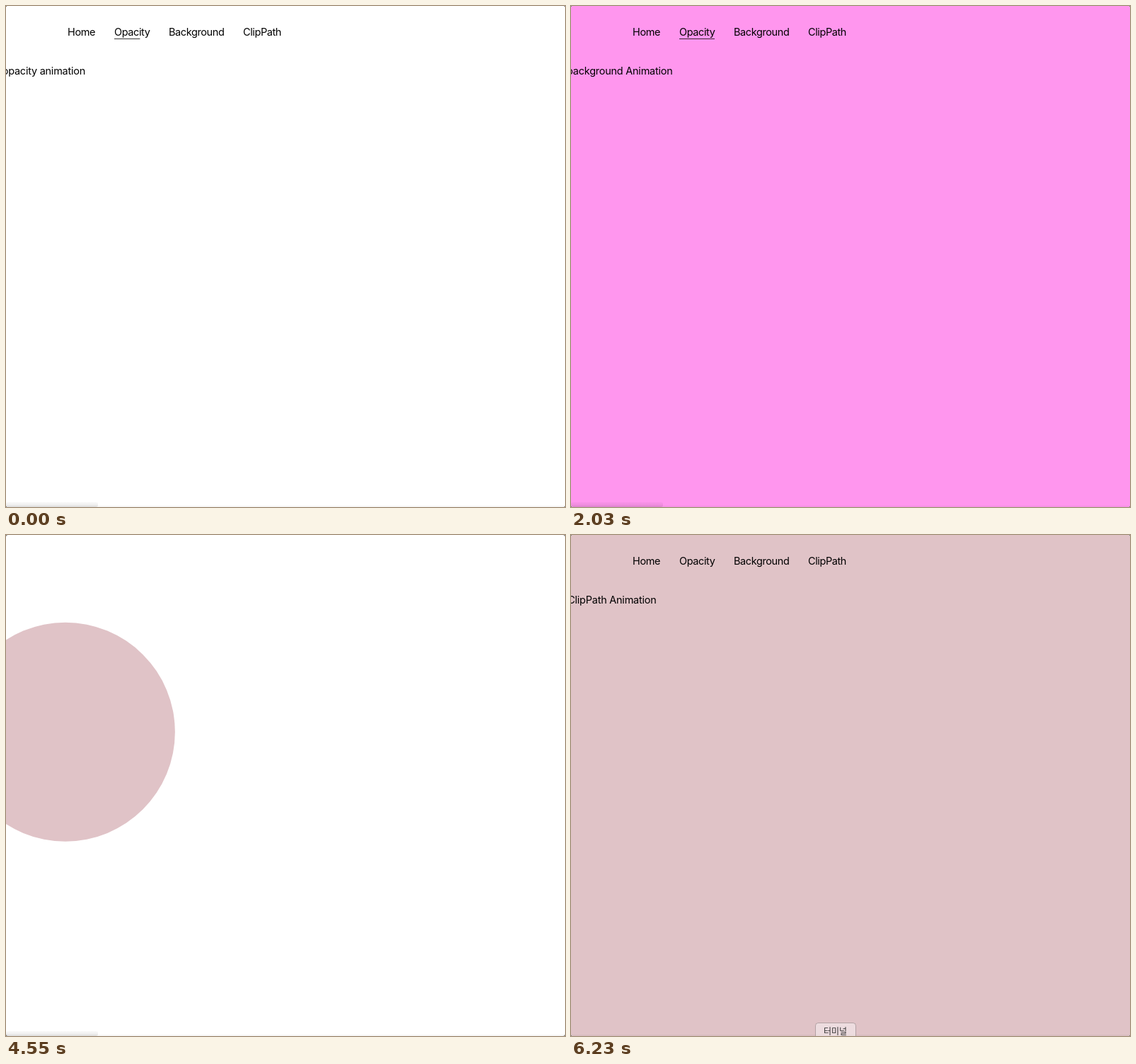
Write an HTML page that moves like this. It is 790 px wide and 709 px high and loops after 6.44 s.

```html
<!DOCTYPE html>
<html lang="en">
<head>
<meta charset="utf-8">
<title>Page transitions</title>
<style>
  html, body { margin: 0; width: 100%; height: 100%; overflow: hidden; background: #666; }
  #window { position: relative; width: 790px; height: 709px; overflow: hidden; border-radius: 3px; background: #fff; }
  #page, #page svg, #dock { position: absolute; inset: 0; }
  text { font: 14.5px Inter, "Open Sans", sans-serif; letter-spacing: -.4px; fill: #000; }
  #title { text-anchor: end; letter-spacing: -.25px; }
  #tip text { font: 12px "Noto Sans CJK KR", "Noto Sans CJK", sans-serif; letter-spacing: 0; text-anchor: middle; fill: #333; }
</style>
</head>
<body>
<div id="window">
  <div id="page">
    <svg width="790" height="709">
      <g id="content">
        <g id="nav"></g>
        <text id="title" y="97"></text>
      </g>
    </svg>
  </div>
  <svg id="dock" width="790" height="709">
    <defs>
      <linearGradient id="shade" x2="0" y2="1">
        <stop offset="0" stop-opacity=".02"/>
        <stop offset="1" stop-opacity=".1"/>
      </linearGradient>
    </defs>
    <rect id="shadow" y="702" width="130" height="7" rx="3" fill="url(#shade)"/>
    <rect y="707" width="790" height="2" fill-opacity=".03"/>
    <g id="tip">
      <rect x="345.5" y="690.5" width="57" height="24" rx="4" fill="#fff" fill-opacity=".42" stroke="#000" stroke-opacity=".22"/>
      <text x="373.5" y="707">터미널</text>
    </g>
  </svg>
</div>
<script>
const LOOP = 6440, STEP = 70, HOVER = 400;
const $ = id => document.getElementById(id);
const clamp = p => Math.min(1, Math.max(0, p));
const span = (t, from, to) => clamp((t - from) / (to - from));
const mix = (a, b, p) => a + (b - a) * p;
const easeInOut = p => p < .5 ? 2 * p * p : 1 - 2 * (1 - p) ** 2;

// CSS "ease": cubic-bezier(.25, .1, .25, 1), solved by bisection
function ease(p) {
  const bezier = (a, b, s) => 3 * a * s * (1 - s) ** 2 + 3 * b * s * s * (1 - s) + s ** 3;
  let low = 0, high = 1;
  for (let i = 0; i < 20; i++) {
    const mid = (low + high) / 2;
    bezier(.25, .25, mid) < p ? low = mid : high = mid;
  }
  return bezier(.1, 1, low);
}
const grow = (t, start, time = HOVER) => ease(span(t, start, start + time));

// Underline width as a share of the label, by time
const links = [
  { label: "Home", x: 87, width: 39, line: () => 0 },
  { label: "Opacity", x: 153, width: 50, line: t =>
      t < 1000 ? 1 - grow(t, -76) : grow(t, 1300) - grow(t, 2500) },
  { label: "Background", x: 230, width: 78, line: t =>
      t < 2000 ? grow(t, 20) - grow(t, 1280) : grow(t, 2560, 220) - grow(t, 2780) },
  { label: "ClipPath", x: 335, width: 55, line: t => t < 5000 ? grow(t, 2796) : 0 }
];

function svg(tag, attrs, parent) {
  const node = document.createElementNS("http://www.w3.org/2000/svg", tag);
  for (const key in attrs) node.setAttribute(key, attrs[key]);
  return parent.appendChild(node);
}
for (const link of links) {
  svg("text", { x: link.x, y: 41.5 }, $("nav")).textContent = link.label;
  link.bar = svg("rect", { x: link.x, y: 46, height: 1, "fill-opacity": .78 }, $("nav"));
}

const pages = {
  opacity: { title: "opacity animation", end: 112, color: "#fff" },
  background: { title: "background Animation", end: 143.5, color: "#ff96ee" },
  clip: { title: "ClipPath Animation", end: 120.5, color: "#e0c3c7" }
};

const star = [[0, -950], [221, -285], [968, -324], [362, 137], [586, 797],
              [0, 386], [-583, 822], [-362, 137], [-968, -285], [-221, -285]];
function starClip(t) {
  if (t >= 1400) return "none";
  const scale = 2.72 * easeInOut(span(t, 700, 1680));
  return `polygon(${star.map(([x, y]) => `${253 + x * scale}px ${20 + y * scale}px`)})`;
}

// x, y and radius of the travelling circle
const stops = [[-680, 34, 155], [81, 214, 155], [100, 642, 155], [395, 375, 590]];
function circleClip(t) {
  const place = span(t, 3700, 5700) * 3;
  if (place >= 3) return "none";
  const i = Math.floor(place), p = easeInOut(place - i);
  const [x, y, r] = stops[i].map((v, k) => mix(v, stops[i + 1][k], p));
  return `circle(${r}px at ${x}px ${y}px)`;
}

function draw(t) {
  const name = t < 700 ? "opacity" : t < 2520 ? "background" : t < 3780 ? "opacity" : "clip";
  const { title, end, color } = pages[name];
  $("title").textContent = title;
  $("title").setAttribute("x", end);
  $("page").style.background = color;
  $("page").style.clipPath = name === "background" ? starClip(t) : name === "clip" ? circleClip(t) : "none";

  const fading = t >= 2520 && t < 3290;
  $("content").setAttribute("opacity", fading ? grow(t, 2490, 500) : 1);
  $("content").setAttribute("transform", `translate(0 ${fading ? -1 : 0})`);
  for (const link of links) link.bar.setAttribute("width", link.width * clamp(link.line(t)));
  $("shadow").setAttribute("opacity", t < 4800 ? 1 : 0);
  $("tip").setAttribute("opacity", span(t, 5950, 6230));
}

const start = performance.now();
function tick() {
  const t = (performance.now() - start) % LOOP;
  draw(Math.floor(t / STEP) * STEP);
  requestAnimationFrame(tick);
}
tick();
</script>
</body>
</html>
```
